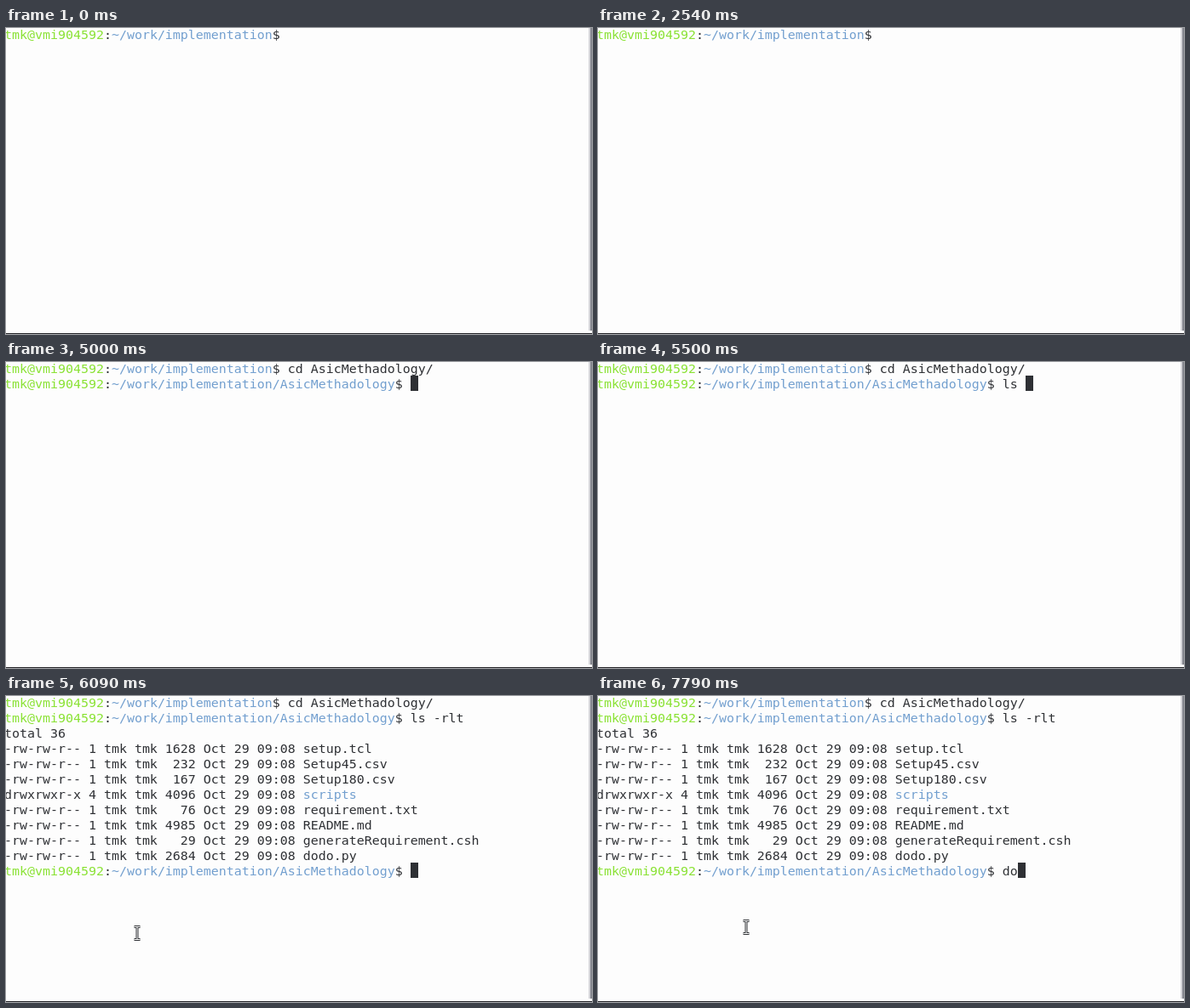
These frames come from a looping animation (688 px wide and 360 px high, 8 s). An HTML page:

```html
<!DOCTYPE html>
<html lang="en">
<head>
<meta charset="utf-8">
<title>Terminal</title>
<style>
html, body { margin: 0; width: 100%; height: 100%; overflow: hidden; background: #fdfdfd; }
#stage { position: relative; width: 688px; height: 360px; overflow: hidden; background: #fdfdfd; }
#screen {
  position: absolute; left: -2px; top: -1px; margin: 0; color: #2e3034;
  font: 14.95px/18px "DejaVu Sans Mono", "Liberation Mono", monospace;
  white-space: pre;
}
.row { height: 18px; }
.user { color: #8ae234; }
.path, .dir { color: #729fcf; }
#caret { position: absolute; width: 9px; height: 18px; background: #2e3034; }
#pointer { position: absolute; left: -5px; top: -10px; width: 10px; height: 20px; }
#bar { position: absolute; left: 684px; top: 0; width: 2px; height: 356px; background: #d4d4d8; }
#edge { position: absolute; left: 686px; top: 0; width: 2px; height: 356px; background: #85878f; }
#base { position: absolute; left: 0; top: 359px; width: 688px; height: 1px; background: #222226; }
</style>
</head>
<body>
<div id="stage">
  <div id="screen"></div>
  <div id="caret"></div>
  <div id="bar"></div><div id="edge"></div><div id="base"></div>
  <svg id="pointer" viewBox="0 0 10 20" fill="none">
    <defs><path id="beam" d="M1.5 2.5H8.5M5 2.5V17.5M1.5 17.5H8.5"/></defs>
    <use href="#beam" stroke="#2e3034" stroke-width="3"/>
    <use href="#beam" stroke="#fdfdfd" stroke-width="1"/>
  </svg>
</div>
<script>
const LOOP = 8000;
const CELL = 9, LINE = 18;
const USER = "tmk";
const HOST = USER + "@vmi904592";
const HOME = "~/work/implementation";
const PROJECT = HOME + "/AsicMethadology";

// Command line states: [time, row, typed text]
const typing = [
  [0, 0, ""], [4000, 0, "c"], [4090, 0, "cd"], [4210, 0, "cd "],
  [4500, 0, "cd A"], [4630, 0, "cd As"], [4750, 0, "cd AsicMethadology/"],
  [5000, 1, ""], [5210, 1, "l"], [5340, 1, "ls"], [5460, 1, "ls "],
  [5540, 1, "ls -"], [5590, 1, "ls -r"], [5640, 1, "ls -rl"], [5690, 1, "ls -rlt"],
  [5750, 11, ""], [7750, 11, "d"], [7790, 11, "do"]
];

// Caret visibility: [time, on]
const blink = [
  [0, 0], [540, 1], [1130, 0], [1750, 1], [2340, 0], [2880, 1], [3460, 0],
  [4000, 1], [6420, 0], [6920, 1], [7500, 0], [7750, 1]
];

// Mouse path: [time, x, y]
const mouse = [
  [5880, 108, 372], [5960, 126, 318], [6040, 141, 284], [6170, 174, 272]
];

const files = [
  [1628, "setup.tcl"], [232, "Setup45.csv"], [167, "Setup180.csv"], [4096, "scripts"],
  [76, "requirement.txt"], [4985, "README.md"], [29, "generateRequirement.csh"], [2684, "dodo.py"]
];

const byId = id => document.getElementById(id);
const screenBox = byId("screen"), caret = byId("caret"), pointer = byId("pointer");
const span = (kind, text) => `<span class="${kind}">${text}</span>`;
const prompt = (path, text) => span("user", HOST) + ":" + span("path", path) + "$ " + text;

function fileRow([size, name]) {
  const dir = name === "scripts";
  const mode = dir ? "drwxrwxr-x 4" : "-rw-rw-r-- 1";
  return `${mode} ${USER} ${USER} ${String(size).padStart(4)} Oct 29 09:08 ` +
    (dir ? span("dir", name) : name);
}

const listing = ["total 36", ...files.map(fileRow)];

function rowsFor(row, text) {
  if (row === 0) return [prompt(HOME, text)];
  const first = prompt(HOME, "cd AsicMethadology/");
  if (row === 1) return [first, prompt(PROJECT, text)];
  return [first, prompt(PROJECT, "ls -rlt"), ...listing, prompt(PROJECT, text)];
}

function stateAt(table, t) {
  let found = table[0];
  for (const step of table) if (step[0] <= t) found = step;
  return found;
}

function mouseAt(t) {
  const i = mouse.findIndex(p => p[0] > t);
  if (i === 0) return null;
  if (i < 0) return mouse[mouse.length - 1].slice(1);
  const [t0, x0, y0] = mouse[i - 1], [t1, x1, y1] = mouse[i];
  const k = (t - t0) / (t1 - t0);
  return [Math.round(x0 + (x1 - x0) * k), Math.round(y0 + (y1 - y0) * k)];
}

let shown = null;

function draw(t) {
  const state = stateAt(typing, t);
  const [, row, text] = state;
  if (state !== shown) {
    screenBox.innerHTML = rowsFor(row, text).map(r => `<div class="row">${r}</div>`).join("");
    shown = state;
  }
  const path = row ? PROJECT : HOME;
  const column = HOST.length + path.length + 3 + text.length;
  caret.style.left = column * CELL - 2 + "px";
  caret.style.top = row * LINE - 2 + "px";
  caret.style.visibility = stateAt(blink, t)[1] ? "visible" : "hidden";

  // The pointer is sampled every 40 ms
  const at = mouseAt(Math.floor(t / 40) * 40 + 10);
  pointer.style.visibility = at ? "visible" : "hidden";
  if (at) pointer.style.transform = `translate(${at[0]}px, ${at[1]}px)`;
}

const start = performance.now();
function tick() {
  draw((performance.now() - start) % LOOP);
  requestAnimationFrame(tick);
}
tick();
</script>
</body>
</html>
```
